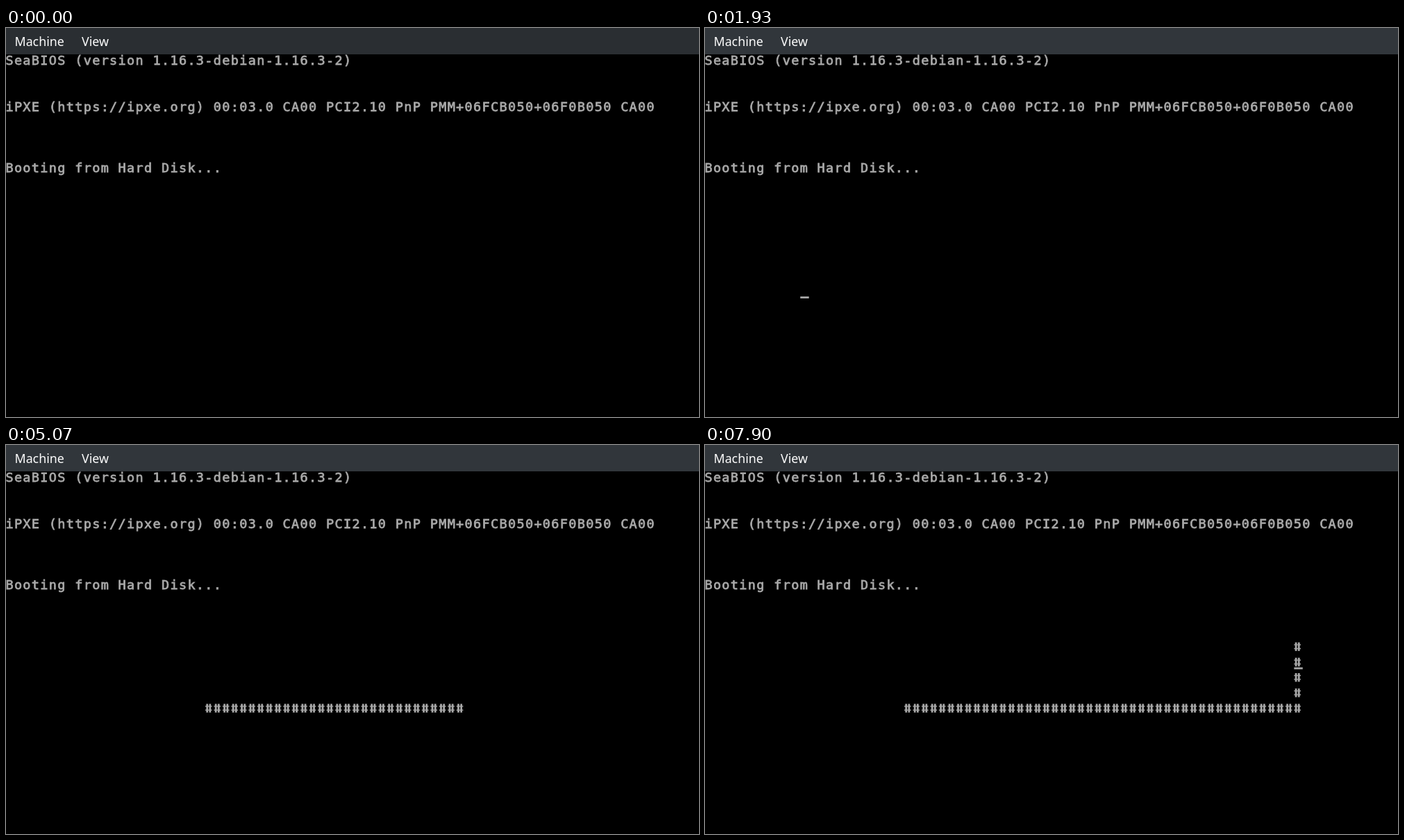
Animation of 998 by 561 pixels, one loop 8 s. Source, as an HTML page with a canvas:

```html
<!DOCTYPE html>
<html lang="en">
<head>
<meta charset="utf-8">
<title>Boot screen</title>
<style>
html, body { margin: 0; width: 100%; height: 100%; overflow: hidden; background: #000; }
canvas { display: block; }
</style>
</head>
<body>
<canvas id="screen" width="998" height="561"></canvas>
<script>
const ctx = document.getElementById('screen').getContext('2d');
const LOOP = 8000, TOP = 36.5;
const DOT = 998 / 720, CELL_W = 9 * DOT, CELL_H = 16 * DOT;  // 80-column text mode
const GREY = '#a8a8a8', FIRST = 23, LAST = 68, LINE = 15;
const BOOT = [
  [0, 'SeaBIOS (version 1.16.3-debian-1.16.3-2)'],
  [3, 'iPXE (https://ipxe.org) 00:03.0 CA00 PCI2.10 PnP PMM+06FCB050+06F0B050 CA00'],
  [7, 'Booting from Hard Disk...']
];
const TAPS = [3180, 3270, 3360, 3530];   // single key presses before the key is held
const CLIMB = [6600, 6800, 7100, 7330];  // presses of the up key

const clamp = (v, lo, hi) => Math.max(lo, Math.min(hi, v));
const passed = (times, t) => times.filter(s => t >= s).length;

function print(text, row) {
  const y = TOP + row * CELL_H + 12 * DOT;
  [...text].forEach((ch, i) => {
    const x = i * CELL_W - 0.6;
    ctx.fillText(ch, x, y);
    ctx.strokeText(ch, x, y);
  });
}

// Fills a box given in dots inside a character cell.
function dots(col, row, x, y, w, h) {
  ctx.fillRect(col * CELL_W + x * DOT, TOP + row * CELL_H + y * DOT, w * DOT, h * DOT);
}

function hash(col, row) {
  for (const x of [1, 4]) dots(col, row, x, 3, 2, 9);
  for (const y of [5, 9]) dots(col, row, 0, y, 7, 1);
}

function drawMenu(t) {
  const k = clamp((t - 700) / 130, 0, 1);
  const mix = (a, b) => Math.round(a + (b - a) * k);
  ctx.fillStyle = `rgb(${mix(42, 49)},${mix(46, 54)},${mix(50, 59)})`;
  ctx.fillRect(0, 0, 998, 38);
  ctx.fillStyle = '#fcfcfc';
  ctx.font = '17.8px "Noto Sans", sans-serif';
  ctx.fillText('Machine', 12.5, 26);
  ctx.fillText('View', 109, 26);
}

function trailLength(t) {
  if (t < 4070) return passed(TAPS, t);
  return Math.min(LAST - FIRST + 1, Math.floor(12.6 + (t - 4370) / 40));
}

function cursorCell(t, climbed) {
  if (t >= 5900) return climbed ? [LAST, LINE + 1 - climbed] : [LAST - 1, LINE];
  if (t < 3000) return [11 + clamp(Math.floor((t - 1941) / 59), 0, 9), LINE];
  return [Math.min(26, 21 + Math.floor((t - 3000) / 90)), LINE];
}

function cursorOn(t) {
  if (t < 870 || (t >= 4070 && t < 5900)) return false;
  const [start, half] = t < 4070 ? [1833, 167] : [6270, 163];
  return Math.floor((t - start) / half) % 2 === 0;
}

function draw(t) {
  ctx.fillStyle = '#000';
  ctx.fillRect(0, 0, 998, 561);
  drawMenu(t);

  ctx.fillStyle = ctx.strokeStyle = GREY;
  ctx.lineWidth = 0.8;
  ctx.font = '18.5px "DejaVu Sans Mono", monospace';
  BOOT.forEach(([row, text]) => print(text, row));

  const length = trailLength(t), climbed = passed(CLIMB, t);
  for (let i = 0; i < length; i++) hash(FIRST + i, LINE);
  for (let i = 1; i <= climbed; i++) hash(LAST, LINE - i);

  if (cursorOn(t)) dots(...cursorCell(t, climbed), 0, 13, 9, 2);
}

function frame() {
  draw(performance.now() % LOOP);
  requestAnimationFrame(frame);
}
frame();
</script>
</body>
</html>
```
